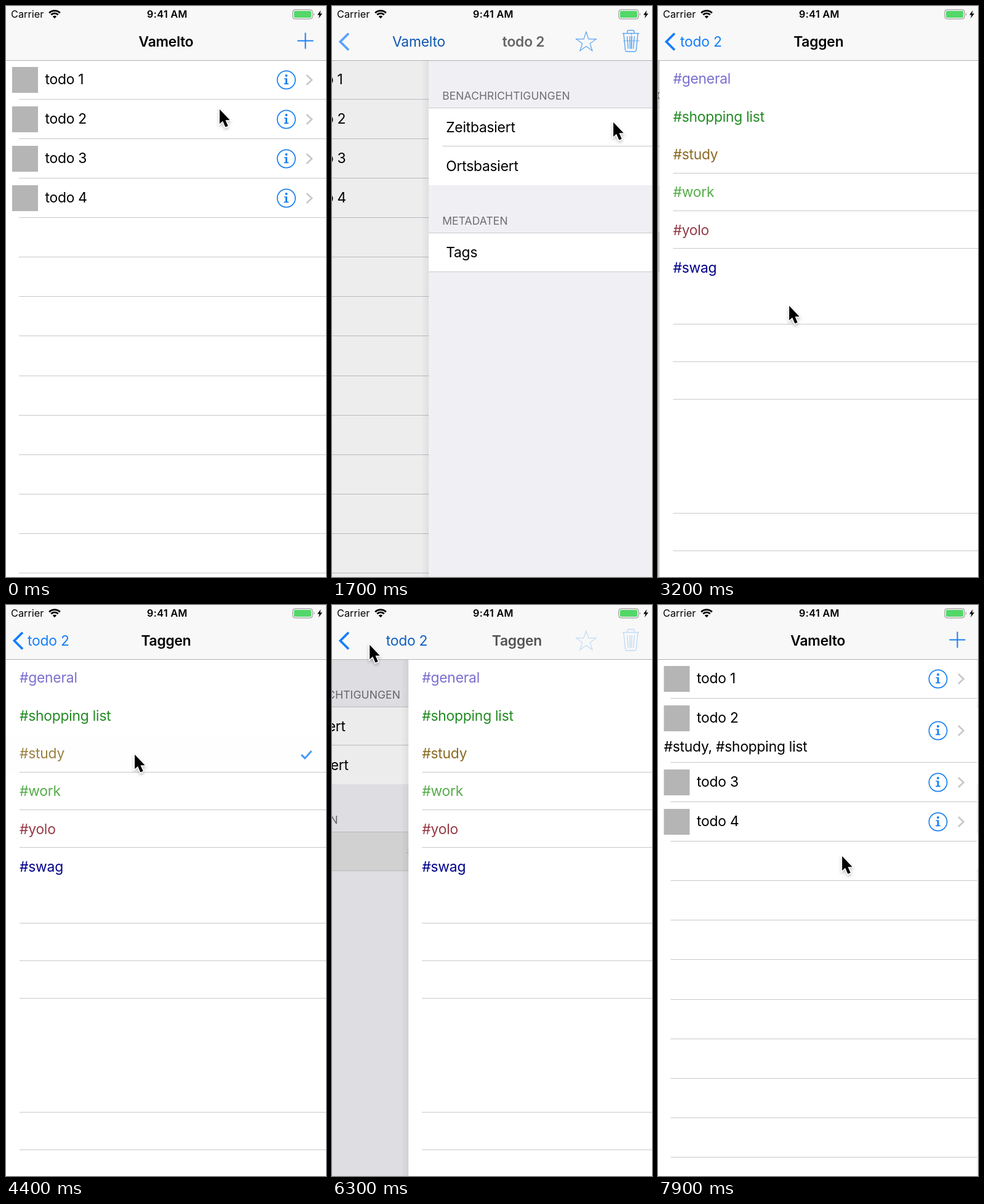
Animation, 520 px wide and 927 px high, one loop 8000 ms. Source, as an HTML page:

```html
<!DOCTYPE html>
<html lang="de">
<head>
<meta charset="utf-8">
<title>Todo list</title>
<style>
  html, body { margin: 0; width: 100%; height: 100%; overflow: hidden; background: #fff; }
  svg { display: block; position: fixed; left: 0; top: 0; width: 100%; height: 100%; }
  text { font: 400 22.9px Inter, Roboto, "Liberation Sans", sans-serif; letter-spacing: -0.26px; white-space: pre; }
  .head { font-size: 17.5px; letter-spacing: 0.08px; fill: #6d6d72; }
  .status { font-size: 16.3px; letter-spacing: 0; }
  .name { font-weight: 600; text-anchor: middle; }
  .line { fill: none; stroke-linecap: butt; }
  .blue { stroke: #1a80f0; }
</style>
</head>
<body>
<svg id="stage" viewBox="0 0 520 927" xmlns="http://www.w3.org/2000/svg"></svg>
<script>
const LOOP = 8000, W = 520, PARALLAX = 156, BLUE = [21, 126, 251];
const NAMES = ["Vamelto", "todo 2", "Taggen"];
const PICKED = "#study, #shopping list";
const TAGS = [
  ["general", "#7a6fd0"], ["shopping list", "#228b22"], ["study", "#8b6a22"],
  ["work", "#56ad4a"], ["yolo", "#963a46"], ["swag", "#00008b"]
];
const TAPS = { 2: 4200, 1: 4850 };           // tag row: time of its tap
const PUSHES = [1568, 2790], POPS = [6250, 7465];
// time, x, y of the pointer tip
const PATH = [
  [0, 346, 165], [600, 346, 165], [1400, 456, 186], [2350, 456, 186],
  [2680, 330, 395], [2800, 330, 395], [3200, 212, 484], [3400, 212, 484],
  [4100, 208, 240], [4500, 208, 240], [4800, 200, 176], [5150, 200, 176],
  [5700, 90, 145], [5950, 60, 62], [6350, 60, 62], [6800, 62, 81],
  [7300, 62, 81], [7410, 62, 63], [7490, 62, 63], [7900, 298, 405], [8000, 298, 405]
];

const clamp = v => Math.min(1, Math.max(0, v));
const mix = (a, b, p) => a + (b - a) * p;
const rect = (x, y, w, h, fill, more = "") =>
  `<rect x="${x}" y="${y}" width="${w}" height="${h}" fill="${fill}" ${more}/>`;
const text = (x, y, s, more = "") => `<text x="${x}" y="${y}" ${more}>${s}</text>`;
const rule = (x, y) => rect(x, y, W - x, 1, "#c8c7cc");
const chevron = y => `<path class="line" d="M488.5 ${y - 8}l8.5 8l-8.5 8" stroke="#c7c7cc" stroke-width="2.6"/>`;

const info = y => `<g transform="translate(455.5 ${y})">
  <circle r="14.6" class="line blue" stroke-width="1.7"/>
  <circle cy="-7" r="2" fill="#1a80f0"/>
  <path d="M-3.6 -2.8H1.5V5.6H3.8V7.2H-3.8V5.6H-1.4V-1.2H-3.6Z" fill="#1a80f0"/></g>`;

const todo = (n, y) => rect(10, y + 10, 42, 42, "#b5b5b5") + text(63.5, y + 38, "todo " + n);

function listRows(grow) {
  let out = todo(1, 89) + info(120) + chevron(120) + todo(2, 153)
    + info(184 + grow / 2) + chevron(184 + grow / 2)
    + (grow ? text(10, 238, PICKED) : "") + rule(21, 151);
  for (const n of [3, 4]) {
    const y = 89 + 64 * (n - 1) + grow;
    out += todo(n, y) + info(y + 31) + chevron(y + 31);
  }
  for (let k = 1; k < 13; k++) out += rule(21, Math.round(151 + 64.08 * k + grow));
  return out;
}

const toggle = y => rect(425, y - 21.5, 71, 43, "#55d66c", 'rx="21.5"')
  + `<circle cx="474.5" cy="${y}" r="19.5" fill="#fff" filter="url(#soft)"/>`;

const detail = rect(0, 0, W, 927, "#efeff4")
  + text(22, 152, "BENACHRICHTIGUNGEN", 'class="head"')
  + rect(0, 165, W, 126, "#fff") + rule(0, 165) + rule(22, 227)
  + text(28, 205, "Zeitbasiert") + toggle(197)
  + text(28, 268, "Ortsbasiert") + toggle(259.5)
  + text(22, 355, "METADATEN", 'class="head"')
  + rect(0, 368, W, 64, "#fff") + rect(0, 369, W, 62, "#d9d9d9", 'id="tagsRow"')
  + rule(0, 368) + rule(0, 431) + text(28, 408, "Tags")
  + text(473.5, 408, PICKED, 'id="value" text-anchor="end" fill="#b9b9be"') + chevron(400);

const tagList = rect(0, 0, W, 927, "#fff")
  + TAGS.map(([name, color], i) => {
      const y = 118.5 + 61.3 * i;
      return rect(0, y - 29, W, 61, "#d9d9d9", `id="glow${i}" opacity="0"`)
        + text(22, y + 7.8, "#" + name, `id="tag${i}" fill="${color}"`)
        + `<path id="check${i}" opacity="0" class="line" d="M480 ${y + 2}l5.8 5.8l10.6 -11.8" stroke="#1a80f5" stroke-width="3"/>`;
    }).join("")
  + [271, 332, 393, 516, 577, 638, 823, 884].map(y => rule(22, y)).join("");

const screen = (i, body) => `<g id="screen${i}">
  ${i ? rect(-12, 88, 12, 839, "url(#edge)", `id="edge${i}"`) : ""}${body}
  ${rect(0, 0, W, 927, "#000", `id="dim${i}" opacity="0"`)}</g>`;

function star() {
  let d = "";
  for (let k = 0; k < 10; k++) {
    const r = k % 2 ? 6.6 : 17, a = k * Math.PI / 5;
    d += (k ? "L" : "M") + (413 + r * Math.sin(a)).toFixed(1) + " " + (59 - r * Math.cos(a)).toFixed(1);
  }
  return `<path class="line blue" d="${d}Z" stroke-width="1.2"/>`;
}

const trash = `<path class="line blue" stroke-width="1.4" d="M472 44.5H499M480 44V41.5Q480 39.5 482 39.5H489Q491 39.5 491 41.5V44
  M474 45L476.6 71.5Q476.9 74 479.4 74H491.6Q494.1 74 494.4 71.5L497 45M479.6 49L481.3 69.5M483.8 49L484.4 69.5M487.2 49L486.6 69.5M491.4 49L489.7 69.5"/>`;

const statusBar = text(8, 19, "Carrier", 'class="status"')
  + text(262, 19, "9:41 AM", 'class="status" text-anchor="middle" style="font-weight:600;letter-spacing:.3px"')
  + `<path class="line" stroke="#000" stroke-width="2.9" d="M70.2 11.2A12.5 12.5 0 0 1 87.8 11.2M73.3 14.3A8 8 0 0 1 84.7 14.3"/>
     <path d="M75.8 17A4.5 4.5 0 0 1 82.2 17L79 20.2Z"/>`
  + rect(466, 6, 32, 15, "none", 'rx="3.6" stroke="#858585"') + rect(468, 8, 28, 11, "#53d769", 'rx="1.8"')
  + `<path d="M500 11Q502 13.5 500 16Z" fill="#858585"/><path d="M511.6 7L506 14.4H509.4L508 20L514 12.2H510.4Z"/>`;

const stage = document.getElementById("stage");
stage.innerHTML = `<defs>
  <linearGradient id="edge"><stop offset="0" stop-opacity="0"/><stop offset="1" stop-opacity=".06"/></linearGradient>
  <filter id="soft" x="-40%" y="-40%" width="180%" height="180%"><feDropShadow dx="0" dy="3" stdDeviation="2.5" flood-opacity=".25"/></filter>
  </defs>`
  + screen(0, rect(0, 0, W, 927, "#fff") + `<g id="short">${listRows(0)}</g><g id="long">${listRows(40)}</g>`)
  + screen(1, detail) + screen(2, tagList)
  + rect(0, 0, W, 88, "#f8f8f8") + rect(0, 88, W, 1, "#b2b2b2") + statusBar
  + `<path id="plus" class="line blue" d="M473.5 56.5H499.5M486.5 43.5V69.5" stroke-width="2"/>
     <path id="back" class="line" d="M27 44.5L13.5 58L27 71.5" stroke="#157efb" stroke-width="3.8"/>
     <g id="tools">${star()}${trash}</g>`
  + NAMES.map((s, i) => text(0, 66, s, `id="name${i}" class="name"`)).join("")
  + `<path id="pointer" d="M1.2 2.7V26.2L6.2 21.7L10.5 31.5L14.8 29.7L10.6 20.2H17.8Z" stroke="#fff" stroke-width="2.6" paint-order="stroke" filter="url(#soft)"/>`;

const el = {};
stage.querySelectorAll("[id]").forEach(n => el[n.id] = n);
const set = (id, key, v) => el[id].setAttribute(key, v);
const fade = (id, v) => set(id, "opacity", clamp(v).toFixed(3));
const move = (id, x, y = 0) => set(id, "transform", `translate(${x.toFixed(2)} ${y.toFixed(2)})`);
const halves = NAMES.map((s, i) => {
  el["name" + i].style.fontWeight = 400;
  const half = el["name" + i].getComputedTextLength() / 2;
  el["name" + i].style.fontWeight = 600;
  return half;
});

// critically damped spring from 0 to 1
function spring(ms) {
  if (ms <= 0) return 0;
  if (ms > 700) return 1;
  const x = 18.26 * ms / 1000;
  return 1 - (1 + x) * Math.exp(-x);
}

function pointerAt(t) {
  let k = 1;
  while (k < PATH.length - 1 && PATH[k][0] < t) k++;
  const a = PATH[k - 1], b = PATH[k], u = clamp((t - a[0]) / (b[0] - a[0])), e = u * u * (3 - 2 * u);
  return [mix(a[1], b[1], e), mix(a[2], b[2], e)];
}

function drawName(i, depth) {
  const id = "name" + i, ahead = i - depth, node = el[id];
  const center = 260, home = 35 + halves[i];
  if (ahead >= 0) {
    move(id, center + 169 * ahead);
    fade(id, Math.pow(clamp(1 - ahead), 1.5));
    node.style.fontWeight = 600;
    node.style.fill = "#000";
    return;
  }
  const p = clamp(-ahead), gone = clamp(-ahead - 1);
  move(id, mix(center, home, Math.pow(p, 1.18)) - 130 * gone);
  fade(id, 1 - 1.4 * gone);
  node.style.fontWeight = Math.round(mix(600, 400, clamp(p * 1.5)));
  node.style.fill = `rgb(${BLUE.map(c => Math.round(c * p)).join()})`;
}

function draw(t) {
  let depth = 0;
  for (const at of PUSHES) depth += spring(t - at);
  for (const at of POPS) depth -= spring(t - at);

  for (let i = 0; i < 3; i++) {
    const over = clamp(depth - i);
    move("screen" + i, depth < i ? W * (i - depth) : -PARALLAX * over);
    fade("dim" + i, 0.1 * over);
    if (i) fade("edge" + i, 2 * (1 - Math.abs(i - depth)));
    drawName(i, depth);
  }
  const updated = t > 5000;
  set("short", "display", updated ? "none" : "inline");
  set("long", "display", updated ? "inline" : "none");
  set("value", "display", updated ? "inline" : "none");

  fade("plus", 1 - depth);
  fade("back", depth);
  fade("tools", 1 - Math.abs(1 - depth));
  fade("tagsRow", t < 2720 ? 0 : 1 - spring(t - POPS[0]));

  for (const i in TAPS) {
    const u = clamp((t - TAPS[i]) / 250);
    fade("glow" + i, u > 0 ? (1 - u) ** 2 : 0);
    fade("tag" + i, 1 - u * (1 - u));
    fade("check" + i, u);
  }
  move("pointer", ...pointerAt(t));
}

const start = performance.now();
function tick(now) {
  draw(Math.max(0, now - start) % LOOP);
  requestAnimationFrame(tick);
}
draw(0);
requestAnimationFrame(tick);
</script>
</body>
</html>
```
